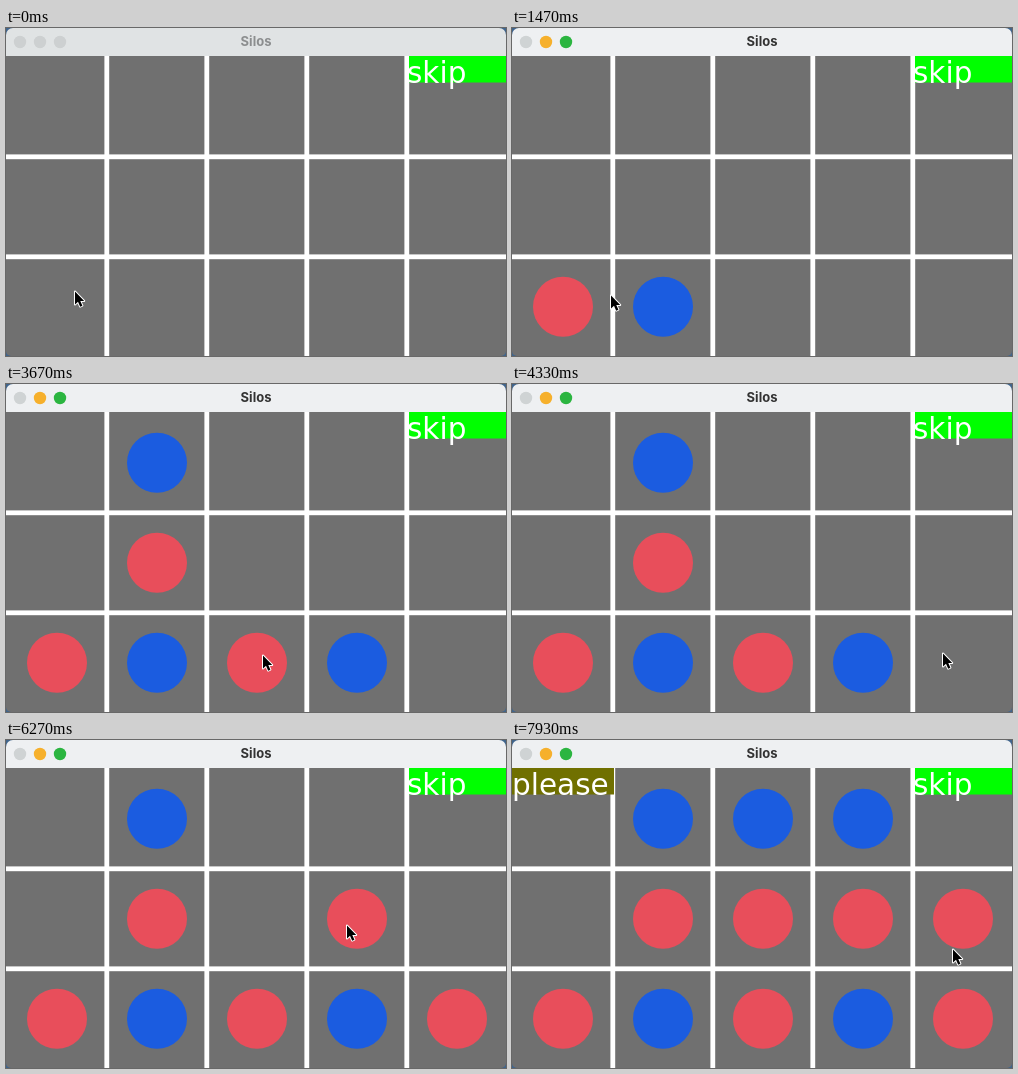
An HTML page with a canvas for the animation above (8000 ms loop, 500 by 328 pixels).

```html
<!DOCTYPE html>
<html lang="en">
<head>
<meta charset="utf-8">
<title>Silos</title>
<style>
html, body { margin: 0; width: 100%; height: 100%; overflow: hidden; background: #41658c; }
canvas { display: block; }
</style>
</head>
<body>
<canvas id="stage" width="500" height="328"></canvas>
<script>
const ctx = document.getElementById('stage').getContext('2d');
const LOOP = 8000, FOCUS_AT = 500, BAR = 28, CELL = 100, ROWS = 3;
const REPLY_DELAY = 60, TRAVEL = 300, REST = 200;
const RED = '#e84e5b', BLUE = '#1b5ce0';

// The pointer rests before each click; red drops into the clicked column, blue into the reply column.
const click = (at, x, y, reply) => ({ at, x, y, reply, arrive: at - REST, clicked: true });
const pass = (at, x, y) => ({ x, y, arrive: at });
const stops = [
  pass(0, 68, 262),
  click(1000, 52, 272, 1),
  pass(1470, 98, 266),
  click(2070, 150, 190, 1),
  pass(2870, 293, 234),
  click(3270, 256, 270, 3),
  click(4530, 430, 268),
  pass(5600, 292, 182),
  click(6270, 340, 184, 3),
  click(7000, 270, 184, 2),
  click(7660, 440, 208),
];

// Play the game once: pieces stack up, and a missing reply shows the prompt until the next click.
const pieces = [], prompts = [], heights = Array(5).fill(0);
const drop = (at, col, color) => pieces.push({ at, col, row: ROWS - ++heights[col], color });
const turns = stops.filter(stop => stop.clicked);
turns.forEach(({ at, x, reply }, i) => {
  drop(at, Math.floor(x / CELL), RED);
  if (reply === undefined) prompts.push([at + REPLY_DELAY, turns[i + 1]?.at ?? LOOP]);
  else drop(at + REPLY_DELAY, reply, BLUE);
});

function pointerAt(t) {
  let { x, y } = stops[0];
  for (const stop of stops) {
    const u = Math.min(1, Math.max(0, (t - stop.arrive) / TRAVEL + 1));
    const eased = u * u * (3 - 2 * u);
    x += (stop.x - x) * eased;
    y += (stop.y - y) * eased;
  }
  return [x, y];
}

function rect(color, x, y, w, h) {
  ctx.fillStyle = color;
  ctx.fillRect(x, y, w, h);
}

function disc(color, x, y, r) {
  ctx.fillStyle = color;
  ctx.beginPath();
  ctx.arc(x, y, r, 0, 7);
  ctx.fill();
}

function text(str, x, y, font, color, align) {
  ctx.font = font;
  ctx.fillStyle = color;
  ctx.textAlign = align;
  ctx.fillText(str, x, y);
}

function drawTitleBar(active) {
  rect(active ? '#eef0f2' : '#e0e3e4', 0, 0, 500, BAR);
  const lights = active ? ['#cfd3d4', '#f6b02c', '#2bb540'] : Array(3).fill('#cdd0d1');
  lights.forEach((color, i) => disc(color, 14 + 20 * i, 14, 6.2));
  text('Silos', 250, 18.3, '700 13px Inter, sans-serif', active ? '#333' : '#8c8e8f', 'center');
}

function drawLabel(str, color, x, w, textX) {
  rect(color, x, BAR, w, 26.5);
  text(str, textX, 55, '29.5px "DejaVu Sans", sans-serif', '#fff', 'left');
}

function drawBoard(t) {
  rect('#707070', 0, BAR, 500, 300);
  for (let i = 1; i < 5; i++) rect('#fff', i * CELL - 1.6, BAR, 4.8, 300);
  for (let i = 1; i < ROWS; i++) rect('#fff', 0, BAR + i * CELL - 1.6, 500, 4.8);
  for (const { at, col, row, color } of pieces)
    if (t >= at) disc(color, col * CELL + 51, row * CELL + 78.7, 30);
  drawLabel('skip', '#00ff00', 403, 97, 401);
  if (prompts.some(([from, to]) => t >= from && t < to))
    drawLabel('please', '#707000', 0, 102, 0);
}

const arrow = new Path2D('M0 0V13L3 10.3L5.2 15.2L7.4 14.2L5.3 9.5H9.2Z');
function drawPointer(t) {
  const [x, y] = pointerAt(t);
  ctx.save();
  ctx.translate(x + 1, y + 1.5);
  ctx.lineWidth = 2;
  ctx.lineJoin = 'round';
  ctx.strokeStyle = '#fff';
  ctx.fillStyle = '#000';
  ctx.stroke(arrow);
  ctx.fill(arrow);
  ctx.restore();
}

function draw(t) {
  rect('#41658c', 0, 0, 500, 328);
  ctx.save();
  ctx.beginPath();
  ctx.roundRect(0, 0, 500, 328, [7, 7, 5, 5]);
  ctx.clip();
  drawTitleBar(t >= FOCUS_AT);
  drawBoard(t);
  ctx.restore();
  drawPointer(t);
}

const start = performance.now();
function tick() {
  draw((performance.now() - start) % LOOP);
  requestAnimationFrame(tick);
}
tick();
</script>
</body>
</html>
```
